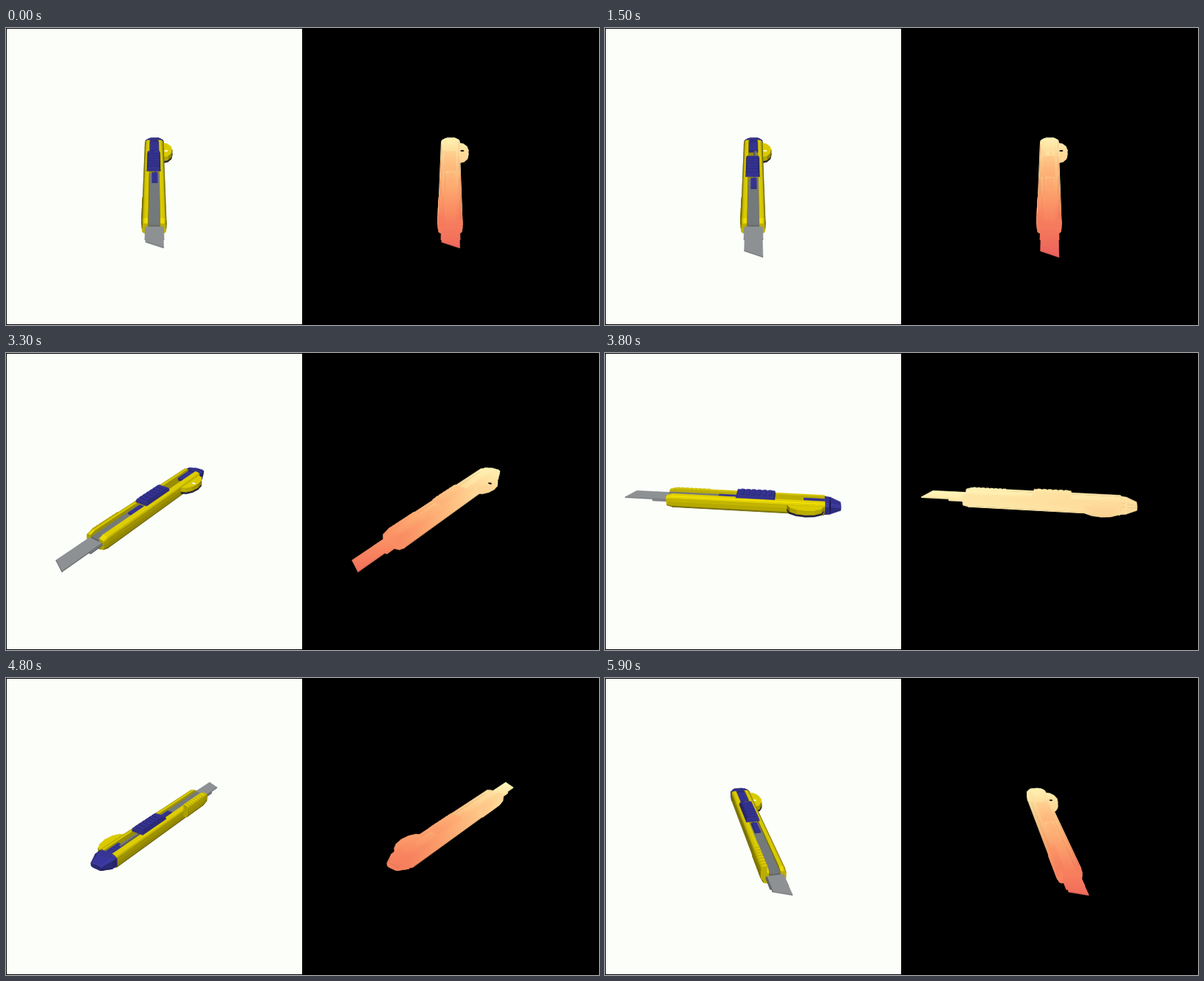
Write an HTML page with a canvas that moves like this. It is 803 px wide and 402 px high and loops after 6000 ms.

```html
<!DOCTYPE html>
<html lang="en">
<head>
<meta charset="utf-8">
<title>Cutter: colour and depth</title>
<style>
html, body { margin: 0; width: 100%; height: 100%; overflow: hidden; background: #000; }
canvas { display: block; }
</style>
</head>
<body>
<canvas id="stage" width="803" height="402"></canvas>
<script>
const ctx = document.getElementById('stage').getContext('2d');
const STEP = 100, FRAMES = 60, HALF = FRAMES / 2;
const DIST = 610, CENTER = 201, PANEL = 401;
const TILT = Math.PI / 6, SIN = Math.sin(TILT), COS = Math.cos(TILT);
const CAM = [0, DIST * SIN, DIST * COS];
const LIGHT = [0, 0.8, 0.6];
const AMBIENT = 0.4;

const YELLOW = [248, 230, 0], OLIVE = [176, 160, 12], BLUE = [60, 58, 164];
const STEEL = [160, 165, 167], IRON = [132, 137, 140], DARK = [44, 42, 78];
const PAPER = '#fcfefa';

// Main places along the knife
const TAIL = -116.5, ROOT = -95, LIP = 110, MOUTH = 117, INNER = 6.5;

const sub = (a, b) => a.map((n, i) => n - b[i]);
const dot = (a, b) => a.reduce((s, n, i) => s + n * b[i], 0);
const cross = (a, b) => [
  a[1] * b[2] - a[2] * b[1], a[2] * b[0] - a[0] * b[2], a[0] * b[1] - a[1] * b[0]
];
const mean = pts => [0, 1, 2].map(i => pts.reduce((s, p) => s + p[i], 0) / pts.length);
const rgb = c => `rgb(${c.map(Math.round)})`;
const series = (n, fn) => Array.from({ length: n }, (_, i) => fn(i));

// Warm ramp for depth: 0.6 is rose, 1 is pale yellow
function warm(v) {
  const t = Math.min(1, Math.max(0, (v - 0.6) / 0.4));
  return rgb([254 - 33 * (1 - t) ** 4, 73 + 177 * t, 92 + 148 * Math.abs(t - 0.22) ** 1.7]);
}

let faces, turnSin, turnCos;

// u runs to the blade, v sideways, w up
const toWorld = ([u, v, w]) => [v * turnCos - u * turnSin, w, u * turnCos + v * turnSin];

function project([x, y, z]) {
  const d = DIST - z * COS - y * SIN;
  return { x: CENTER + DIST * x / d, y: CENTER - DIST * (y * COS - z * SIN) / d, d };
}

// Convex solid between two rings with the same number of points
function loft(ringA, ringB, color) {
  const a = ringA.map(toWorld), b = ringB.map(toWorld), mid = mean([...a, ...b]);
  const sides = a.map((p, i) => {
    const j = (i + 1) % a.length;
    return [p, a[j], b[j], b[i]];
  });
  for (const pts of [a, b, ...sides]) {
    const at = mean(pts);
    let normal = cross(sub(pts[1], pts[0]), sub(pts[pts.length - 1], pts[0]));
    const size = Math.hypot(...normal) || 1;
    const flip = dot(normal, sub(at, mid)) < 0 ? -1 : 1;
    normal = normal.map(c => c * flip / size);
    if (dot(normal, sub(CAM, at)) <= 0) continue;
    const shade = AMBIENT + (1 - AMBIENT) * Math.max(0, dot(normal, LIGHT));
    faces.push({ pts: pts.map(project), fill: rgb(color.map(c => c * shade)) });
  }
}

const ring = (u, outline) => outline.map(([v, w]) => [u, v, w]);
const rect = (v0, v1, w0, w1) => [[v0, w0], [v1, w0], [v1, w1], [v0, w1]];
const prism = (outline, u0, u1, color) => loft(ring(u0, outline), ring(u1, outline), color);
const box = (u0, u1, v0, v1, w0, w1, color) => prism(rect(v0, v1, w0, w1), u0, u1, color);
const slab = (plan, w0, w1, color) =>
  loft(plan.map(p => [...p, w0]), plan.map(p => [...p, w1]), color);

// Point on a rounded rectangle
const rounded = (angle, rx, ry) => [Math.cos(angle), Math.sin(angle)]
  .map((c, i) => Math.sign(c) * Math.sqrt(Math.abs(c)) * (i ? ry : rx));

// Rounded outer half of the handle, side -1 or 1
const shell = (side, reach, height) => series(9, i => {
  const [v, w] = rounded(Math.PI * (0.5 - i / 8), reach, height);
  return [side * (INNER + v) - 0.4, w];
});
const octagon = (rx, ry) => series(8, i => rounded((i + 0.5) * Math.PI / 4, rx, ry));

// Evenly spaced positions, farthest first
function spaced(start, gap, count, camU) {
  const list = series(count, i => start + i * gap);
  return camU > start ? list : list.reverse();
}

// Two pieces on either side of a plane, farthest first
function inOrder(firstIsFar, first, second) {
  const order = firstIsFar ? [first, second] : [second, first];
  order.forEach(draw => draw());
}

function outerBlade(tip) {
  box(MOUTH, 137, -10.5, 10.5, -1, 1.2, STEEL);
  slab([[MOUTH, -9.6], [MOUTH, 9.8], [tip, 9.8], [tip - 10, -9.6]], 1.2, 2.2, STEEL);
}

function cap() {
  const root = ring(ROOT, octagon(14.6, 9.2));
  const shoulder = ring(-103, octagon(14, 8.2));
  const tail = ring(TAIL, octagon(8.5, 3.4));
  inOrder(turnCos > 0, () => loft(shoulder, tail, BLUE), () => loft(root, shoulder, BLUE));
}

function loop() {
  const plan = series(7, i => {
    const a = Math.PI * i / 6;
    return [-70 - 24 * Math.cos(a), 13 + 13.5 * Math.sin(a)];
  });
  slab(plan, -4, -1, DARK);
  slab(plan, -1, 5, YELLOW);
  if (turnCos > 0.8) {
    const hole = series(8, i => {
      const a = Math.PI * i / 4;
      return project(toWorld([-73 + 2.4 * Math.cos(a), 17.4 + 3 * Math.sin(a), 2]));
    });
    faces.push({ pts: hole, hole: true });
  }
}

function rail(side, camU) {
  const full = shell(side, 7.5, 9.2);
  inOrder(camU > LIP,
    () => prism(full, ROOT, LIP, YELLOW),
    () => loft(ring(LIP, full), ring(MOUTH, shell(side, 7.2, 7.2)), YELLOW));
}

function leftRail(camU, camV) {
  const ribs = () => spaced(62, 6, 8, camU)
    .forEach(u => prism(shell(-1, 7.9, 9.9), u, u + 3.4, YELLOW));
  inOrder(camV > -14, ribs, () => rail(-1, camU));
}

function rightRail(camU, camV) {
  inOrder(camV < 13.8, loop, () => rail(1, camU));
}

function groove(front) {
  box(ROOT, MOUTH, -INNER, INNER, -8, 2, OLIVE);
  box(ROOT, -68, -INNER, INNER, 2, 6, BLUE);
  box(-68, front, 1, 4.5, 2, 4, IRON);
  box(front, MOUTH, -6.3, 6.3, 2, 5, IRON);
  box(front, front + 24, -3.2, 4, 5, 7, BLUE);
}

function slider(front, camU) {
  const back = front - 52;
  const plan = inset => [
    [back + inset, -10 + inset], [front - inset, -10 + inset],
    [front - inset, 8 - inset], [back + inset, 8 - inset]
  ];
  loft(plan(0).map(p => [...p, 9]), plan(1).map(p => [...p, 13]), BLUE);
  for (const u of spaced(back + 5, 7.4, 6, camU)) box(u, u + 4, -8, 6, 13, 14.2, BLUE);
}

function build(frame) {
  const turn = Math.max(0, frame - HALF) * 2 * Math.PI / HALF;
  const slide = frame < HALF ? frame : FRAMES - frame;
  turnSin = Math.sin(turn);
  turnCos = Math.cos(turn);
  faces = [];

  const camU = DIST * COS * turnCos, camV = DIST * COS * turnSin;
  const front = slide + 1;
  const blade = () => outerBlade(153.5 + slide);
  const left = () => leftRail(camU, camV), right = () => rightRail(camU, camV);

  if (camU < MOUTH) blade();
  if (camU > ROOT) cap();
  if (camV > -INNER) left();
  if (camV < INNER) right();
  groove(front);
  if (camV <= -INNER) left();
  if (camV >= INNER) right();
  slider(front, camU);
  if (camU >= MOUTH) blade();
  if (camU <= ROOT) cap();
}

// Linear gradient that follows the depth across one flat face
function depthFill(pts, far) {
  const n = pts.length, p = pts[0], q = pts[Math.floor(n / 3)], r = pts[Math.floor(2 * n / 3)];
  const ax = q.x - p.x, ay = q.y - p.y, ad = q.d - p.d;
  const bx = r.x - p.x, by = r.y - p.y, bd = r.d - p.d;
  const det = ax * by - bx * ay;
  const gx = (ad * by - bd * ay) / det, gy = (ax * bd - bx * ad) / det;
  const g2 = gx * gx + gy * gy;
  const depths = pts.map(o => o.d);
  const lo = Math.min(...depths), hi = Math.max(...depths);
  if (Math.abs(det) < 0.01 || g2 < 1e-6 || hi - lo < 1) return warm((lo + hi) / 2 / far);
  const along = d => [p.x + gx * (d - p.d) / g2, p.y + gy * (d - p.d) / g2];
  const grad = ctx.createLinearGradient(...along(lo), ...along(hi));
  for (let i = 0; i <= 8; i++) grad.addColorStop(i / 8, warm((lo + (hi - lo) * i / 8) / far));
  return grad;
}

function paint(pts, fill, seam) {
  ctx.beginPath();
  for (const p of pts) ctx.lineTo(p.x, p.y);
  ctx.closePath();
  ctx.fillStyle = ctx.strokeStyle = fill;
  ctx.fill();
  if (seam) ctx.stroke();
}

function render(frame) {
  build(frame);
  const far = Math.max(...faces.flatMap(f => f.pts.map(p => p.d)));
  ctx.fillStyle = '#000';
  ctx.fillRect(0, 0, 803, 402);
  ctx.fillStyle = PAPER;
  ctx.fillRect(1, 1, 400, 400);
  ctx.lineWidth = 0.5;
  ctx.lineJoin = 'round';
  for (const f of faces) paint(f.pts, f.hole ? PAPER : f.fill, !f.hole);
  ctx.save();
  ctx.translate(PANEL, 0);
  for (const f of faces) paint(f.pts, f.hole ? '#000' : depthFill(f.pts, far), !f.hole);
  ctx.restore();
}

const start = performance.now();
let shown = -1;
function tick() {
  const frame = Math.floor((performance.now() - start) / STEP) % FRAMES;
  if (frame !== shown) render(shown = frame);
  requestAnimationFrame(tick);
}
tick();
</script>
</body>
</html>
```
